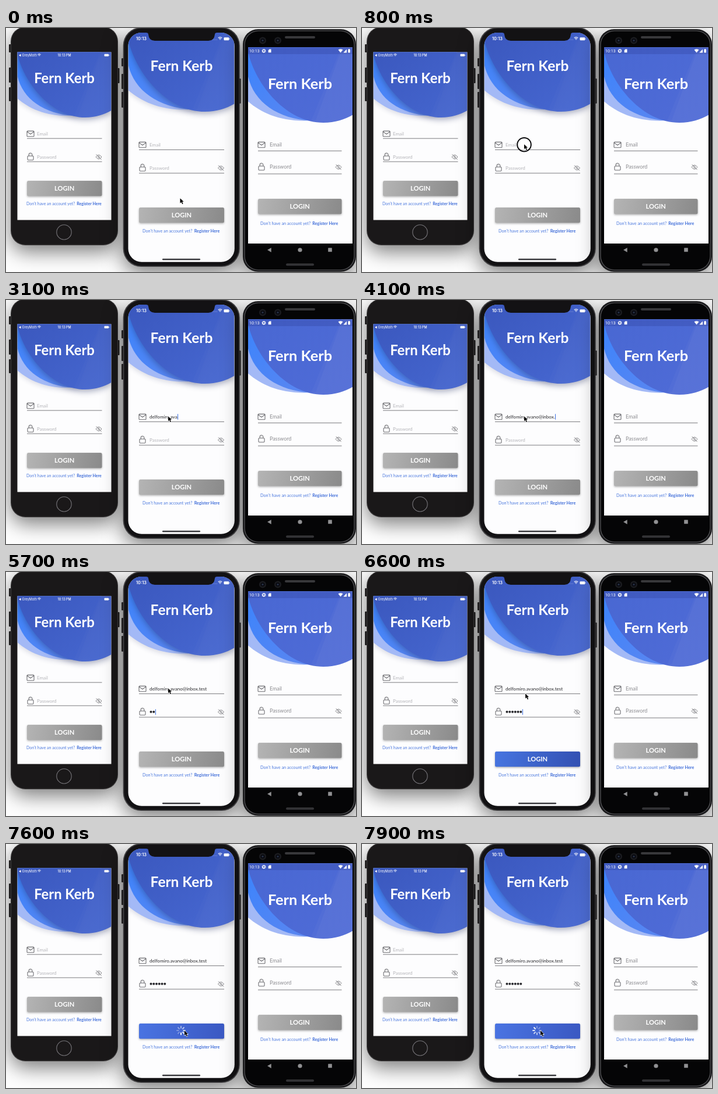
An HTML page with a canvas that plays this animation: 600 by 420 pixels, repeating every 8 s.

```html
<!DOCTYPE html>
<html lang="en">
<head>
<meta charset="utf-8">
<title>Login screens</title>
<style>
html, body { margin: 0; width: 100%; height: 100%; overflow: hidden; background: #fff; }
canvas { display: block; width: 600px; height: 420px; }
</style>
</head>
<body>
<canvas id="stage" width="600" height="420"></canvas>
<script>
const LOOP = 8000;
const APP = 'Fern Kerb';
const MAIL = 'delfomiro.avano@inbox.test';
const FONT = 'Lato, "Open Sans", sans-serif';
const SYS = 'Inter, Roboto, sans-serif';

const stage = document.getElementById('stage').getContext('2d');
const base = document.createElement('canvas');
base.width = 600;
base.height = 420;
let c = base.getContext('2d');

const phones = [
  { x: 19.5, w: 161, top: 41.5, waveY: 154, titleX: 100, titleY: 95, title: 23.8, soft: true,
    l: 36, r: 164.5, mailY: 182, line1: 190, lockY: 222, line2: 230, field: 8, hint: '#b4b4b8',
    btn: 263, note: 302, noteSize: 7, noteX: 35, boldX: 121.3, tint: ['#3c58bf', '#4465cf'] },
  { x: 209.5, w: 182, top: 8, waveY: 144, titleX: 301, titleY: 74, title: 24.5, soft: true,
    l: 228, r: 374, mailY: 201, line1: 209.5, lockY: 241, line2: 249.8, field: 8.05, hint: '#b4b4b8',
    btn: 309, note: 349, noteSize: 7.2, noteX: 234, boldX: 322.7, tint: ['#3c58bf', '#4566d1'] },
  { x: 415, w: 179, top: 33.3, waveY: 163, titleX: 504, titleY: 105, title: 25.3, soft: false,
    l: 432, r: 575.5, mailY: 201, line1: 211.5, lockY: 239.5, line2: 251, field: 8.9, hint: '#8c8c90',
    btn: 294, note: 336, noteSize: 7.25, noteX: 436, boldX: 525.3, tint: ['#4a66d0', '#4d69d5'] }
];
const mid = phones[1];

function box(x, y, w, h, r, fill) {
  c.beginPath();
  c.roundRect(x, y, w, h, r);
  if (fill) { c.fillStyle = fill; c.fill(); }
}

function disc(x, y, r, fill) {
  c.beginPath();
  c.arc(x, y, r, 0, 7);
  c.fillStyle = fill;
  c.fill();
}

function text(s, x, y, size, fill, weight = 400, align = 'left', family = FONT) {
  c.font = `${weight} ${size}px ${family}`;
  c.textAlign = align;
  c.fillStyle = fill;
  c.fillText(s, x, y);
}

function path(d, stroke, width, fill) {
  const p = new Path2D(d);
  if (fill) { c.fillStyle = fill; c.fill(p); }
  if (stroke) { c.strokeStyle = stroke; c.lineWidth = width; c.stroke(p); }
}

function at(x, y, k, draw) {
  c.save();
  c.translate(x, y);
  c.scale(k, k);
  draw();
  c.restore();
}

function shadow(color, blur, dy) {
  c.shadowColor = color;
  c.shadowBlur = blur;
  c.shadowOffsetY = dy;
}

function across(x0, y0, x1, y1, from, to) {
  const g = c.createLinearGradient(x0, y0, x1, y1);
  g.addColorStop(0, from);
  g.addColorStop(1, to);
  return g;
}

function body(x, y, w, h, r, fill) {
  c.save();
  shadow('rgba(0,0,0,.52)', 34, 11);
  box(x, y, w, h, r, fill);
  c.restore();
}

function wifi(x, y, k) {
  at(x, y, k, () => {
    path('M-3.4 -2.2 A4.8 4.8 0 0 1 3.4 -2.2 M-2 -.7 A2.8 2.8 0 0 1 2 -.7', '#fff', 1.1);
    path('M0 1.6 L-1 .4 A1.5 1.5 0 0 1 1 .4 Z', null, 0, '#fff');
  });
}

function waves(p) {
  c.save();
  c.beginPath();
  c.rect(p.x, p.top, p.w, p.waveY + 24 - p.top);
  c.clip();
  at(p.x, p.waveY, p.w / 162, () => {
    const roof = ' L162 -160 L0 -160 Z';
    if (p.soft) shadow('rgba(30,40,90,.16)', 9, 3);
    path('M0 -33 C22 -14 55 1 105 -4' + roof, null, 0, '#a3b9f6');
    shadow('transparent', 0, 0);
    path('M0 -72 C9 -32 46 -6 98 -3' + roof, null, 0, across(0, -90, 90, 0, '#3f84fb', '#5b86f0'));
    if (p.soft) shadow('rgba(30,40,90,.42)', 11, 3.5);
    c.globalAlpha = .94;
    path('M0 -110 C12 -58 60 0 117 0 C135 0 150 -5 162 -12' + roof, null, 0,
      across(20, -120, 120, 0, ...p.tint));
  });
  c.restore();
}

function envelope(x, y) {
  at(x, y, 1, () => {
    c.lineJoin = 'round';
    path('M-5 -4.6 H5 Q6 -4.6 6 -3.6 V3.8 Q6 4.8 5 4.8 H-5 Q-6 4.8 -6 3.8 V-3.6 Q-6 -4.6 -5 -4.6 Z M-5.8 -3.6 L0 .8 L5.8 -3.6',
      '#6c6c70', 1.1);
  });
}

function lock(x, y) {
  at(x, y - .5, 1, () => {
    box(-5, -1.2, 10, 7, 1.2);
    c.strokeStyle = '#6c6c70';
    c.lineWidth = 1.1;
    c.stroke();
    path('M-2.8 -1.2 V-3.4 A2.8 2.8 0 0 1 2.8 -3.4 V-1.2', '#6c6c70', 1.1);
  });
}

function eyeOff(x, y) {
  at(x, y, 1, () => {
    path('M-5 0 Q0 -7 5 0 Q0 7 -5 0 Z M-4.4 -4.6 L4.6 4.6', '#77777b', .9);
    c.beginPath();
    c.arc(0, 0, 1.5, 0, 7);
    c.lineWidth = .6;
    c.stroke();
  });
}

function button(p, colors) {
  const w = p.r - p.l;
  c.save();
  shadow('rgba(0,0,0,.3)', 3.5, 1.5);
  box(p.l, p.btn, w, 26.3, 2.5, across(p.l, p.btn, p.r, p.btn + 26, ...colors));
  c.restore();
}

function label(p) {
  text('LOGIN', (p.l + p.r) / 2, p.btn + 16.6, 11.1, '#fff', 700, 'center');
}

function hint(p, word, y) {
  text(word, p.l + (p === phones[2] ? 20 : p === mid ? 18 : 17), y + 2.8, p.field, p.hint);
}

function form(p) {
  waves(p);
  text(APP, p.titleX, p.titleY, p.title, '#fff', 700, 'center');
  envelope(p.l + 6, p.mailY);
  lock(p.l + 6, p.lockY);
  eyeOff(p.r - 5.5, p.lockY);
  c.fillStyle = '#7a7a7e';
  for (const y of [p.line1, p.line2]) c.fillRect(p.l, y - .4, p.r - p.l, 1);
  text("Don't have an account yet?", p.noteX, p.note + 2.5, p.noteSize, '#4a78de');
  text('Register Here', p.boldX, p.note + 2.5, p.noteSize, '#3b6ad8', 700);
  if (p !== mid) {
    hint(p, 'Email', p.mailY);
    hint(p, 'Password', p.lockY);
    button(p, ['#b4b4b4', '#8a8a8a']);
    label(p);
  }
}

function leftPhone() {
  for (const [y, h] of [[28, 14], [68, 26], [102, 24]]) box(5, y, 4, h, 1, '#2a2829');
  box(191, 69, 3.5, 26, 1, '#2a2829');
  body(8, -2, 184, 376, 25, '#3b393a');
  box(9.2, -1, 181.6, 373.8, 24, '#1a1819');
  c.fillStyle = '#fdfdfe';
  c.fillRect(19.5, 41.5, 161, 289);
  c.beginPath();
  c.arc(99.5, 351.5, 12.7, 0, 7);
  c.strokeStyle = '#77757a';
  c.lineWidth = 1.1;
  c.stroke();
  form(phones[0]);
  path('M25.5 44.7 V49.3 L22 47 Z', null, 0, '#fff');
  text('GreyMoth', 27.5, 49, 5.5, '#fff', 400, 'left', SYS);
  wifi(57, 47.5, .8);
  text('10:13 PM', 100, 49, 5.5, '#fff', 500, 'center', SYS);
  box(168.5, 44.8, 7.5, 4, 1, '#fff');
  c.fillRect(176.5, 46, .8, 1.6);
}

function midPhone() {
  for (const [y, h] of [[52, 14], [79, 26], [110, 27]]) box(198, y, 4, h, 1, '#2a2829');
  box(399, 87, 3.5, 43, 1, '#2a2829');
  body(200.7, -1, 200, 412, 31, '#3f3e40');
  box(202.4, .5, 196.6, 409, 30, '#131214');
  c.save();
  box(209.5, 8, 182.3, 394.8, 23, '#fdfdfe');
  c.clip();
  form(mid);
  path('M240 8 Q244 8 244 11 Q245 22 255 22 H347 Q357 22 358 11 Q358 8 362 8 Z', null, 0, '#131214');
  c.restore();
  text('10:13', 223, 21.3, 7.3, '#fff', 600, 'left', SYS);
  for (let i = 0; i < 4; i++) disc(355 + i * 2.1, 20, .5, 'rgba(255,255,255,.55)');
  wifi(367, 19.2, .95);
  box(373.5, 16.2, 8.8, 5, 1.2, '#fff');
  c.fillRect(382.8, 17.8, .8, 1.8);
  box(268, 397, 65, 2.4, 1.2, '#3a3a3e');
}

function rightPhone() {
  body(406, 2, 194, 417.5, 26, '#19191b');
  box(408.5, 4.5, 189, 412.5, 24, '#58585b');
  box(409.6, 5.6, 186.8, 410.3, 23, '#050506');
  for (const x of [440, 466]) {
    disc(x, 21.5, 6, '#1b1c20');
    disc(x, 21.5, 3.6, '#090a10');
    disc(x, 21.5, 1.6, '#283248');
  }
  box(478, 14, 52, 4, 2, '#38383b');
  box(480, 405.2, 48, 4, 2, '#333336');
  c.fillStyle = '#fdfdfe';
  c.fillRect(415, 33.3, 179, 337.7);
  form(phones[2]);
  c.fillStyle = 'rgba(20,30,100,.16)';
  c.fillRect(415, 33.3, 179, 11.7);
  text('10:13', 417, 42, 7.1, '#fff', 400, 'left', 'Roboto, sans-serif');
  c.beginPath();
  c.arc(442, 39.4, 2, 0, 7);
  c.strokeStyle = '#fff';
  c.lineWidth = 1.3;
  c.stroke();
  c.setLineDash([1, 1.2]);
  c.beginPath();
  c.arc(442, 39.4, 2.9, 0, 7);
  c.stroke();
  c.setLineDash([]);
  path('M451.5 36.5 H454.5 V42.3 H449.7 V38.2 Z', null, 0, '#fff');
  path('M569.5 37.6 Q573.5 34.8 577.5 37.6 L573.5 42.4 Z M584 36.4 V42.4 H578.4 Z', null, 0, '#fff');
  box(586.4, 36.8, 3.6, 5.6, .6, '#fff');
  c.fillRect(587.4, 36, 1.6, 1);
  path('M454.7 378.2 V386 L448 382.1 Z', null, 0, '#919193');
  disc(504, 382, 3.6, '#919193');
  box(552.2, 378.6, 6.6, 6.6, .5, '#919193');
}

function pointer(x, y) {
  at(x, y, 1, () => {
    path('M0 0 V9 L2.1 7.1 L3.6 10.5 L5.2 9.8 L3.7 6.5 H6.5 Z', '#fff', 1, '#000');
    path('M0 .3 V8.4 L2.1 6.6 L3.7 10.1 L5 9.5 L3.5 6.1 H6 Z', null, 0, '#000');
  });
}

function ring(x, y) {
  disc(x, y, 11.8, 'rgba(255,255,255,.55)');
  c.strokeStyle = '#0b0b0d';
  c.lineWidth = 2;
  c.stroke();
}

function spinner(x, y, t) {
  const head = Math.floor(t / 125);
  for (let i = 0; i < 8; i++) {
    const age = ((head - i) % 8 + 8) % 8;
    c.save();
    c.translate(x, y);
    c.rotate(i * Math.PI / 4);
    box(-1, -8, 2, 4.8, 1, `rgba(255,255,255,${Math.max(.3, .95 - age * .11)})`);
    c.restore();
  }
}

const ease = (t, a, b) => {
  const u = Math.min(1, Math.max(0, (t - a) / (b - a)));
  return u * u * (3 - 2 * u);
};
const count = (t, start, step, max) => Math.min(max, Math.max(0, Math.floor((t - start) / step)));

function caret(x, y) {
  c.fillStyle = '#3b6fe0';
  c.fillRect(x, y - 4.8, 1, 9.6);
}

function fields(t) {
  const x = 246;
  const typed = MAIL.slice(0, count(t, 1620, 111, MAIL.length));
  const dots = count(t, 5250, 200, 6);
  if (typed) text(typed, x, mid.mailY + 2.8, mid.field, '#29292c');
  else hint(mid, 'Email', mid.mailY);
  const end = typed ? x + c.measureText(typed).width : x;
  if (!dots) hint(mid, 'Password', mid.lockY);
  for (let i = 0; i < dots; i++) disc(x + 2.5 + i * 4.75, mid.lockY - .2, 2, '#2a2a2e');
  if (t >= 900 && t < 4900) {
    if (typed && t < 4500 || t % 1000 < 500) caret(end + .4, mid.mailY);
  } else if (t >= 4900 && t < 6700) caret(x + dots * 4.75 + .4, mid.lockY);
  return dots;
}

function draw(t) {
  c.drawImage(base, 0, 0);
  const ready = fields(t) === 6;
  const busy = t >= 7600;
  button(mid, !ready ? ['#b4b4b4', '#8a8a8a'] : busy ? ['#4a74e2', '#3a58c2'] : ['#4775e0', '#3250b2']);
  if (busy) spinner(300, 321, t);
  else label(mid);

  const go = ease(t, 0, 650), down = ease(t, 6500, 7100);
  const x = 298.5 - 20.5 * go + 28 * down;
  const y = 293 - 93 * go + 121 * down;
  if (t >= 700 && t < 900 || t >= 7400 && t < 7600) ring(x, y + .7);
  pointer(x, y);
}

function paintBase() {
  c.fillStyle = '#fefefe';
  c.fillRect(0, 0, 600, 420);
  leftPhone();
  midPhone();
  rightPhone();
}

paintBase();
c = stage;
const start = performance.now();
function tick() {
  draw((performance.now() - start) % LOOP);
  requestAnimationFrame(tick);
}
draw(0);
requestAnimationFrame(tick);
</script>
</body>
</html>
```
